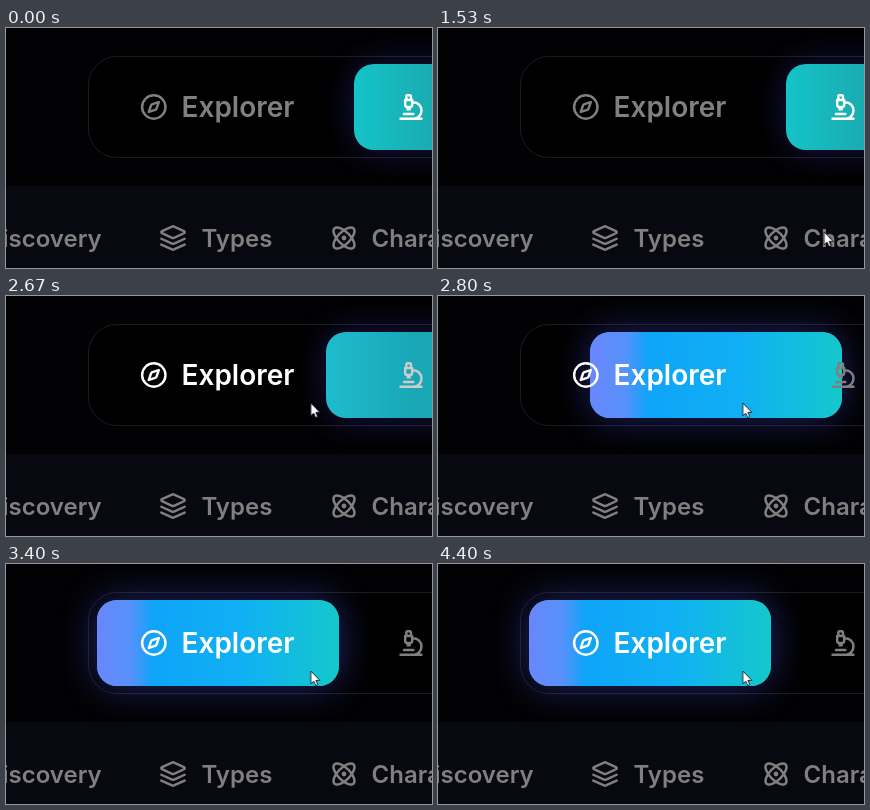
Animation, 426 px wide and 240 px high, one loop 5470 ms. Source, as an HTML page:

```html
<!DOCTYPE html>
<html lang="en">
<head>
<meta charset="utf-8">
<title>Segmented navigation</title>
<style>
  :root {
    --loop: 5470ms;
    --muted: #808080;
  }
  html, body {
    margin: 0;
    width: 100%;
    height: 100%;
    overflow: hidden;
    background: #020204;
  }
  .stage {
    position: relative;
    width: 426px;
    height: 240px;
    overflow: hidden;
  }
  .stage > * { position: absolute; box-sizing: border-box; }

  .track {
    left: 82px;
    top: 28px;
    width: 640px;
    height: 102px;
    border: 1px solid #1b1c23;
    border-radius: 29px;
    background: #000001;
  }
  .panel {
    left: 0;
    top: 158px;
    width: 100%;
    height: 82px;
    background: #080910;
  }
  .thumb {
    top: 36px;
    height: 86px;
    border-radius: 20px;
    background: linear-gradient(90deg, #14c4c8, #1ba8ae 30%, #18a08c);
    animation: slide var(--loop) infinite, glow var(--loop) infinite;
  }
  .thumb::before {
    content: "";
    position: absolute;
    inset: 0;
    border-radius: inherit;
    background: linear-gradient(90deg, #6a86fc, #5691fb 14%, #0fa4f8 23%, #10b0f4 60%, #14c8cb);
    animation: recolor var(--loop) infinite ease-in;
  }

  svg { left: 0; top: 0; }
  text {
    font: 600 24px Inter, "Open Sans", sans-serif;
    fill: currentColor;
  }
  .tab text { font-size: 28px; }
  .icon {
    fill: none;
    stroke: currentColor;
    stroke-width: 2.1;
    stroke-linecap: round;
    stroke-linejoin: round;
  }
  .muted { color: var(--muted); }
  .explorer { animation: brighten var(--loop) infinite; }
  .lab { animation: dim var(--loop) infinite; }
  .cursor {
    fill: #fff;
    stroke: #15151c;
    stroke-width: .9;
    animation: point var(--loop) infinite;
  }

  /* Springs slightly past the resting place, then settles. */
  @keyframes slide {
    0% { left: 348px; width: 287px; }
    48.12% { left: 348px; width: 287px; animation-timing-function: cubic-bezier(.3, .2, .28, 1); }
    54.85% { left: 87px; width: 241px; animation-timing-function: ease-in-out; }
    60%, 100% { left: 91px; width: 242px; }
  }
  @keyframes glow {
    0%, 48.12% { box-shadow: 0 0 32px rgba(72, 66, 225, .32); }
    54.85%, 100% { box-shadow: 0 0 38px rgba(76, 84, 240, .46); }
  }
  @keyframes recolor {
    0%, 48.12% { opacity: 0; }
    50.6%, 100% { opacity: 1; }
  }
  @keyframes brighten {
    0%, 35.8% { color: var(--muted); }
    39.5%, 100% { color: #fff; }
  }
  @keyframes dim {
    0%, 48.12% { color: #fff; }
    51%, 100% { color: var(--muted); }
  }
  @keyframes point {
    0%, 25.6% { transform: translate(420px, 246px); animation-timing-function: cubic-bezier(.3, .3, .5, .9); }
    35.28% { transform: translate(314px, 114px); animation-timing-function: ease-out; }
    40.2%, 100% { transform: translate(304.8px, 107px); }
  }
</style>
</head>
<body>
<div class="stage">
  <div class="track"></div>
  <div class="thumb"></div>
  <div class="panel"></div>
  <svg width="426" height="240" viewBox="0 0 426 240">
    <g class="tab explorer">
      <g class="icon" transform="translate(133.8 65) scale(1.1667)">
        <circle cx="12" cy="12" r="10"/>
        <path d="m16.24 7.76-1.804 5.411a2 2 0 0 1-1.265 1.265L7.76 16.24l1.804-5.411a2 2 0 0 1 1.265-1.265z"/>
      </g>
      <text x="175.5" y="89.3">Explorer</text>
    </g>
    <g class="lab">
      <path class="icon" transform="translate(391 65) scale(1.1667)"
        d="M6 18h8M3 22h18M14 22a7 7 0 1 0 0-14h-1M9 14h2M9 12a2 2 0 0 1-2-2V6h6v4a2 2 0 0 1-2 2ZM12 6V3a1 1 0 0 0-1-1H9a1 1 0 0 0-1 1v3"/>
    </g>
    <g class="muted">
      <text x="95.7" y="219" text-anchor="end">Discovery</text>
      <path class="icon" transform="translate(153 196) scale(1.1667)"
        d="M12.83 2.18a2 2 0 0 0-1.66 0L2.6 6.08a1 1 0 0 0 0 1.83l8.58 3.91a2 2 0 0 0 1.66 0l8.58-3.9a1 1 0 0 0 0-1.83ZM22 17.65l-9.17 4.16a2 2 0 0 1-1.66 0L2 17.65M22 12.65l-9.17 4.16a2 2 0 0 1-1.66 0L2 12.65"/>
      <text x="195.5" y="219">Types</text>
      <g class="icon" transform="translate(324 196) scale(1.1667)">
        <circle cx="12" cy="12" r="1"/>
        <path d="M20.2 20.2c2.04-2.03.02-7.36-4.5-11.9-4.54-4.52-9.87-6.54-11.9-4.5-2.04 2.03-.02 7.36 4.5 11.9 4.54 4.52 9.87 6.54 11.9 4.5Z"/>
        <path d="M15.7 15.7c4.52-4.54 6.54-9.87 4.5-11.9-2.03-2.04-7.36-.02-11.9 4.5-4.52 4.54-6.54 9.87-4.5 11.9 2.03 2.04 7.36.02 11.9-4.5Z"/>
      </g>
      <text x="365.5" y="219">Characters</text>
    </g>
    <path class="cursor" d="M0 0V12.8L2.9 10.2 4.8 14.6 6.9 13.7 5 9.4H9Z"/>
  </svg>
</div>
</body>
</html>
```
